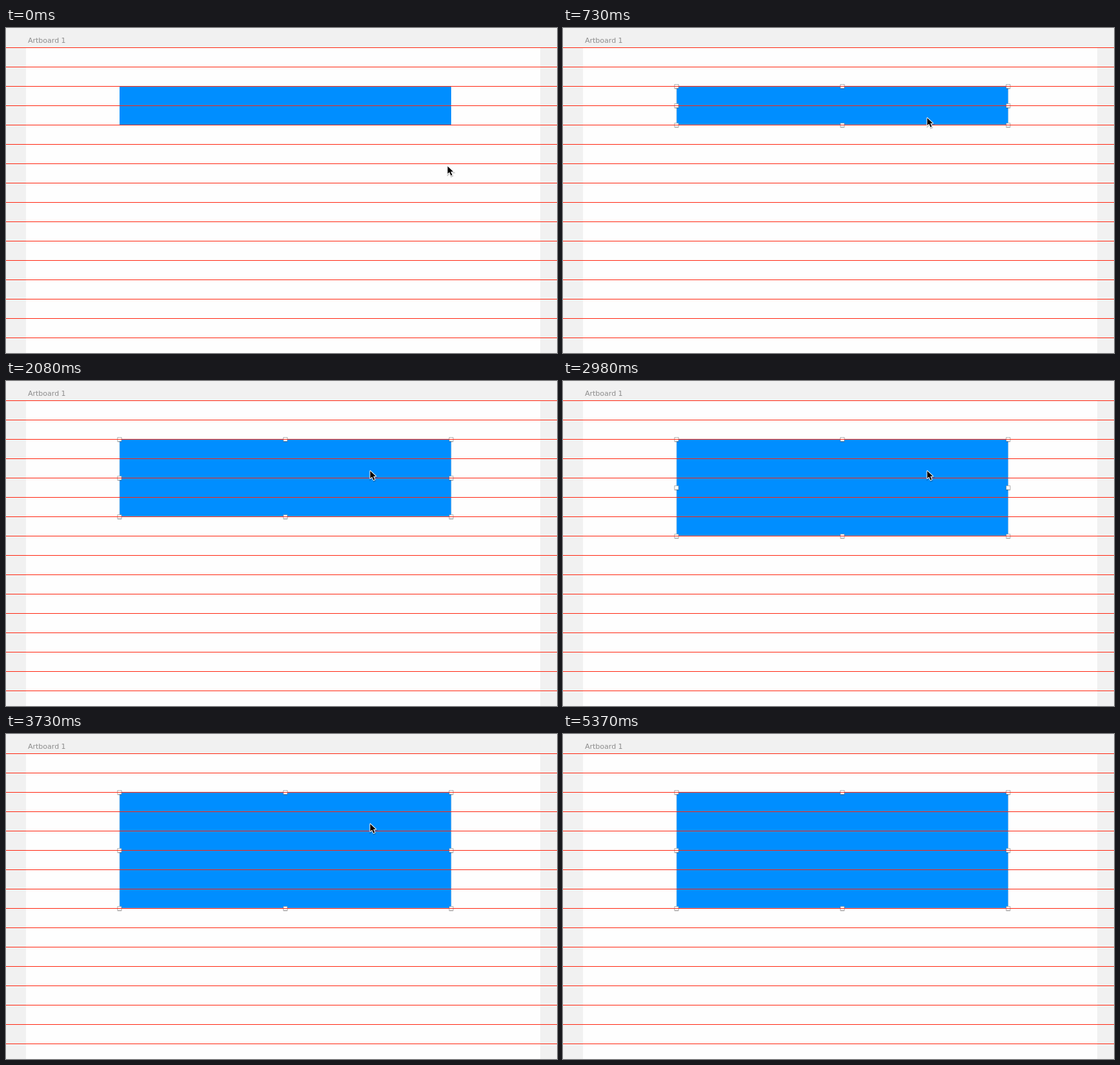
An HTML page for the animation above (6190 ms loop, 854 by 504 pixels).

```html
<!DOCTYPE html>
<html lang="en">
<head>
<meta charset="utf-8">
<title>Artboard</title>
<style>
html, body { margin: 0; width: 100%; height: 100%; overflow: hidden; background: #f1f1f1; }
svg { display: block; width: 854px; height: 504px; }
text { font: 11px "DejaVu Sans", sans-serif; fill: #8b8b8b; }
</style>
</head>
<body>
<svg viewBox="0 0 854 504">
  <defs>
    <g id="handle">
      <rect x="-3.5" y="-2.5" width="7" height="7" rx="1" fill="#000" opacity=".2"/>
      <rect x="-3" y="-3" width="6" height="6" fill="#fff" stroke="#8c8c8c" stroke-width=".6"/>
    </g>
  </defs>
  <rect x="31" y="30" width="797" height="474" fill="#fefefe"/>
  <text x="34" y="23">Artboard 1</text>
  <rect id="box" x="176" y="90" width="514" fill="#008eff"/>
  <rect id="tile" x="519" y="240" width="171" height="30" fill="#008eff"/>
  <rect id="hover" x="176" y="90" width="514" height="60" fill="none" stroke="#4bb0ff" stroke-width="2"/>
  <g id="selection">
    <rect id="outline" x="176" y="90" width="514" fill="none" stroke="#a9c4de" stroke-opacity=".7"/>
  </g>
  <path id="guides" stroke="#ff2610"/>
  <g id="cursor">
    <path d="M1.5 2V13.2L4.3 10.6L6.7 16L8.6 15.2L6.3 9.9H10.2Z" fill="#000" opacity=".22" stroke="#000" stroke-width="2.4" transform="translate(.4 1.2)"/>
    <path d="M1.5 1.6V13L4.3 10.4L6.6 15.7L8.6 14.9L6.3 9.7H10.2Z" stroke="#fff" stroke-width="2" paint-order="stroke" stroke-linejoin="round"/>
  </g>
</svg>
<script>
const LOOP = 6190, LEFT = 176, RIGHT = 690, TOP = 90, GRID = 30;
const $ = id => document.getElementById(id);

// Each track holds [start, value...] steps.
const cursorSteps = [
  [0, 683, 213], [150, 672, 210.5], [290, 599, 176], [440, 580, 162], [580, 563, 138],
  [4920, 562, 139], [5070, 649, 221], [5220, 810, 457], [5370, null]
];
const rowSteps = [[0, 2], [1630, 3], [2080, 4], [2980, 5], [3730, 6]];
const modeSteps = [[0, "idle"], [580, "hover"], [730, "selected"]];

const stepAt = (steps, t) => steps.findLast(([start]) => start <= t).slice(1);
const show = (el, on) => el.setAttribute("visibility", on ? "visible" : "hidden");

$("guides").setAttribute("d",
  Array.from({ length: 16 }, (_, i) => `M0 ${(i + 1) * GRID + 0.5}H854`).join(""));

const handles = [];
for (const u of [0, 0.5, 1]) for (const v of [0, 0.5, 1]) {
  if (u === 0.5 && v === 0.5) continue;
  const el = document.createElementNS("http://www.w3.org/2000/svg", "use");
  el.setAttribute("href", "#handle");
  $("selection").append(el);
  handles.push({ el, u, v });
}

function draw(t) {
  const [rows] = stepAt(rowSteps, t);
  const [mode] = stepAt(modeSteps, t);
  const [x, y] = stepAt(cursorSteps, t);
  const height = rows * GRID;

  $("box").setAttribute("height", height);
  $("outline").setAttribute("height", height);
  for (const { el, u, v } of handles) {
    el.setAttribute("x", LEFT + u * (RIGHT - LEFT));
    el.setAttribute("y", TOP + v * height + 0.5);
  }
  show($("hover"), mode === "hover");
  show($("selection"), mode === "selected");
  show($("tile"), t >= 3580 && t < 3730);
  show($("cursor"), x !== null);
  if (x !== null) $("cursor").setAttribute("transform", `translate(${x} ${y})`);
}

const origin = performance.now();
function tick() {
  draw((performance.now() - origin) % LOOP);
  requestAnimationFrame(tick);
}
tick();
</script>
</body>
</html>
```
